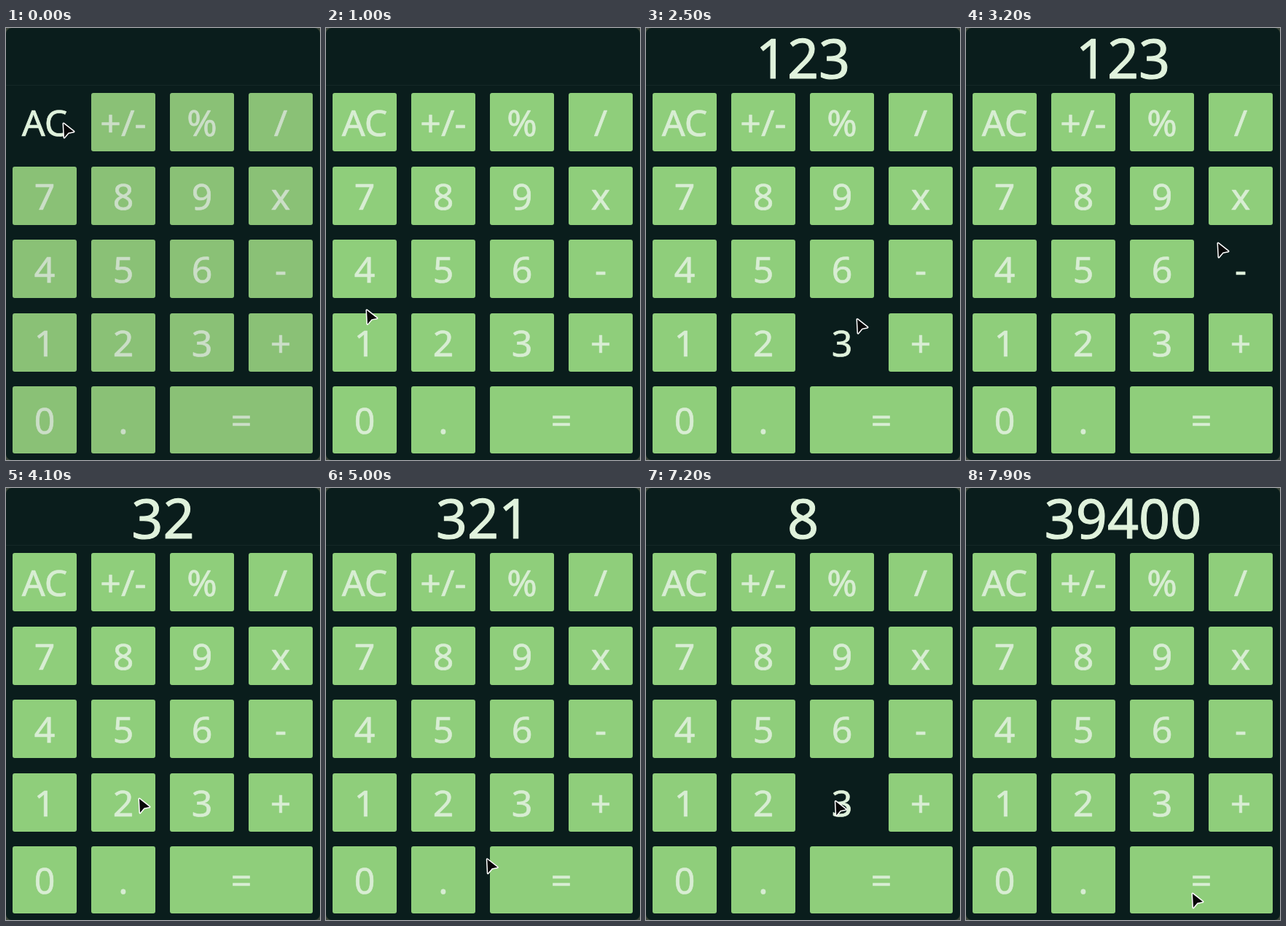
Recreate the animation shown at these times as an HTML page with a canvas. Size 431 px wide and 592 px high, loop 8000 ms.

```html
<!DOCTYPE html>
<html lang="en">
<head>
<meta charset="utf-8">
<title>Calculator</title>
<style>
html, body { margin: 0; width: 100%; height: 100%; overflow: hidden; background: #3c463a; }
canvas { display: block; }
</style>
</head>
<body>
<canvas width="431" height="592"></canvas>
<script>
const ctx = document.querySelector('canvas').getContext('2d');
const LOOP = 8000, FIRST_CLICK = 482, PRESS_TIME = 120;
const DARK = '#0a1d1c', BRIGHT = '#e0f2dc';

const buttons = ['AC +/- % /', '7 8 9 x', '4 5 6 -', '1 2 3 +', '0 . ='].flatMap((row, r) =>
  row.split(' ').map((label, c) => {
    const x = 9 + 108 * c, y = Math.round(89 + 100.5 * r);
    const w = label === '=' ? 196 : 88, h = r === 4 ? 92 : 80;
    return { label, x, y, w, h, cx: x + w / 2, cy: y + h / 2 };
  }));

// Keys in order of use, with the pointer's offset from the key centre where it is unusual
const sequence = [['AC', 24, -1], ['1'], ['2'], ['3'], ['x'], ['3'], ['2', 20, -8],
  ['1'], ['='], ['-', -18, 8], ['8'], ['3'], ['=', -14, 16]];

const operations = { x: (a, b) => a * b, '-': (a, b) => a - b };

function makeCalculator() {
  let shown = '', stored = 0, op = null, fresh = true;
  return key => {
    if (key === 'AC') {
      shown = '';
    } else if (key in operations) {
      [stored, op, fresh] = [+shown, key, true];
    } else if (key === '=') {
      shown = String(operations[op](stored, +shown));
      fresh = true;
    } else {
      shown = fresh ? key : shown + key;
      fresh = false;
    }
    return shown;
  };
}

// Each click follows the last after a reaction time plus a time for the distance
function planClicks() {
  const press = makeCalculator();
  let time = FIRST_CLICK, from = null;
  return sequence.map(([key, dx = -4, dy = 8]) => {
    const b = buttons.find(({ label }) => label === key);
    if (from) time += 296 + 1.69 * Math.hypot(b.cx - from.cx, b.cy - from.cy);
    from = b;
    return { time, x: b.cx + dx, y: b.cy + dy, shown: press(key) };
  });
}
const clicks = planClicks();

const ease = k => k * k * k * (10 + k * (6 * k - 15));

// Rest briefly after one click and before the next
function pointerAt(t) {
  const i = clicks.findIndex(c => c.time > t);
  const b = clicks.at(i), a = i > 0 ? clicks[i - 1] : b;
  const part = (t - a.time) / (b.time - a.time || 1);
  const k = ease(Math.min(1, Math.max(0, (part - 0.12) / 0.76)));
  return [a.x + (b.x - a.x) * k, a.y + (b.y - a.y) * k];
}

function box(x, y, w, h, radius, color) {
  ctx.fillStyle = color;
  ctx.beginPath();
  ctx.roundRect(x, y, w, h, radius);
  ctx.fill();
}

// A thin outline gives the lettering its medium weight
function text(s, x, y, size, color) {
  ctx.font = `${size}px "Noto Sans", "Open Sans", sans-serif`;
  ctx.textAlign = 'center';
  ctx.lineJoin = 'round';
  ctx.lineWidth = size * 0.014;
  ctx.fillStyle = ctx.strokeStyle = color;
  ctx.fillText(s, x, y);
  ctx.strokeText(s, x, y);
}

function drawPointer(x, y) {
  ctx.save();
  ctx.translate(x, y);
  ctx.beginPath();
  [[2, 3], [16, 14], [8.5, 15.5], [3, 22]].forEach(p => ctx.lineTo(...p));
  ctx.closePath();
  ctx.lineJoin = 'round';
  ctx.lineWidth = 3;
  ctx.strokeStyle = '#fff';
  ctx.stroke();
  ctx.fillStyle = '#080808';
  ctx.fill();
  ctx.restore();
}

function draw(t) {
  const [px, py] = pointerAt(t);
  const last = clicks.findLast(c => c.time <= t);
  const pressed = last && t - last.time < PRESS_TIME;
  const k = Math.min(1, t / 900);
  const mix = (a, b) => `rgb(${a.map((v, i) => Math.round(v + (b[i] - v) * k))})`;
  const green = mix([138, 193, 118], [143, 206, 123]);
  const pale = mix([203, 222, 199], [216, 237, 211]);

  ctx.fillStyle = '#3c463a';
  ctx.fillRect(0, 0, 431, 592);
  box(0, 0, 431, 592, 8, DARK);
  ctx.fillStyle = '#142726';
  ctx.fillRect(0, 78, 431, 1);
  if (last) text(last.shown, 215.5, 69, 75.5, BRIGHT);

  for (const { label, x, y, w, h, cx, cy } of buttons) {
    const over = px >= x && px < x + w && py >= y && py < y + h;
    const lit = over && !pressed;
    if (!lit) box(x, y, w, h, 3, green);
    text(label, cx, cy + 19, 50, lit ? BRIGHT : pale);
  }
  drawPointer(px, py);
}

function tick() {
  draw(performance.now() % LOOP);
  requestAnimationFrame(tick);
}
tick();
</script>
</body>
</html>
```
